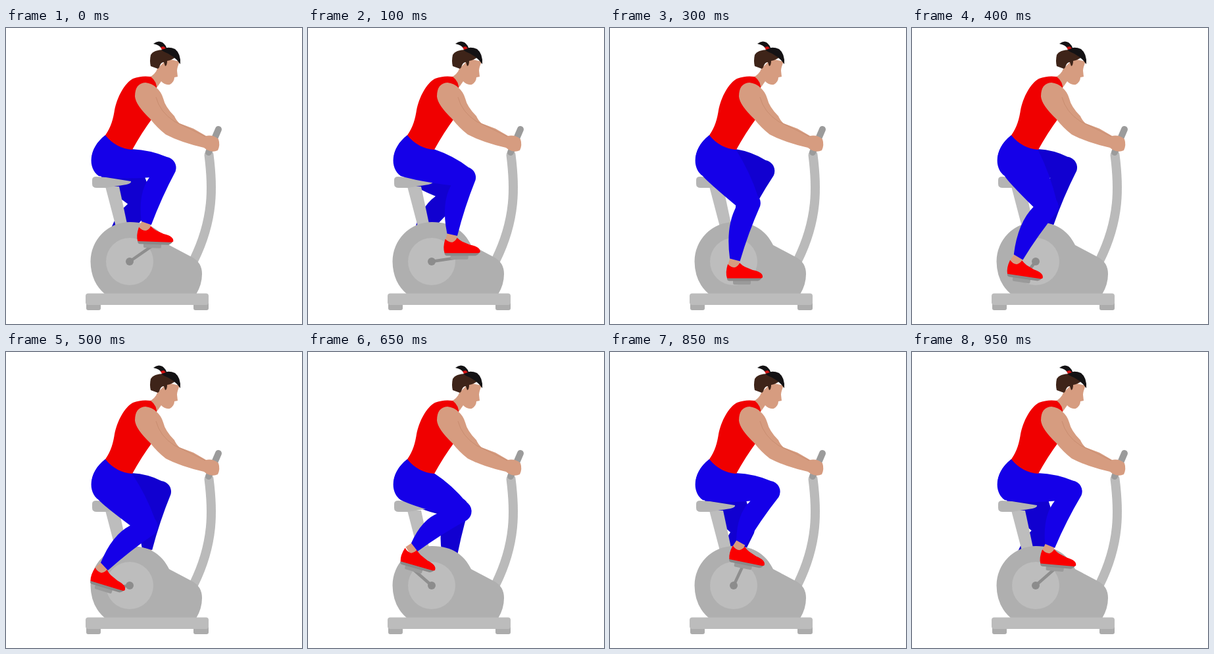
Animation, 450 px wide and 450 px high, one loop 1 s. Source, as an HTML page:

```html
<!DOCTYPE html>
<html lang="en">
<head>
<meta charset="utf-8">
<title>Exercise bike</title>
<style>
  html, body { margin: 0; width: 100%; height: 100%; overflow: hidden; background: #fff; }
  svg { display: block; width: 100vw; height: 100vh; }
</style>
</head>
<body>
<svg viewBox="0 0 450 450">
  <rect width="450" height="450" fill="#fff"/>

  <path id="farSkin" stroke="#d0967a" stroke-width="14"/>
  <path id="farLeg" fill="#1100d0"/>

  <!-- machine -->
  <path d="M151 241H172L185 302H167Z" fill="#bdbdbd"/>
  <path d="M131 231Q131 226 137 226L152 227L190 233Q191 236 183 238L152 243H138Q131 243 131 237Z" fill="#b4b4b4"/>
  <path d="M308.500 193C314.500 240 316.500 290 285.500 353" fill="none" stroke="#bababa" stroke-width="14" stroke-linecap="round"/>
  <path d="M308 189L323 154" stroke="#9b9b9b" stroke-width="10" stroke-linecap="round"/>
  <path d="M122 418H144V426Q144 429 141 429H125Q122 429 122 426ZM285 418H308V426Q308 429 305 429H288Q285 429 285 426Z" fill="#acacac"/>
  <path d="M188.500 295A60 60 0 0 0 128.500 355Q129 387 151 405H289Q298 390 298 374Q298 356 282 348L248 330C238 310 221 295 188.500 295Z" fill="#afafaf"/>
  <rect x="121" y="403.500" width="187" height="17.500" rx="4" fill="#bcbcbc"/>
  <circle cx="188" cy="355" r="36" fill="#bdbdbd"/>
  <path id="crank" stroke="#8e8e8e" stroke-width="4.500" stroke-linecap="round"/>
  <circle cx="188" cy="355" r="6" fill="#8c8c8c"/>

  <path id="nearSkin" stroke="#d69c80" stroke-width="15"/>
  <g id="foot">
    <path d="M0 23H27V28Q27 30 25 30H2Q0 30 0 28Z" fill="#9a9a9a"/>
    <path d="M-9 18H44Q44 22 38 24.500H-6Q-9 24 -9 21Z" fill="#8a8a8a"/>
    <path d="M-8 -1Q-3 4 3 4Q8 2 10 -3Q14 1 18 3L30 8Q46 11 45 19Q44 20.500 40 20.500H-9Q-12 12 -8 -1Z" fill="#fa0000"/>
  </g>
  <path id="nearLeg" fill="#1500e8"/>

  <!-- head and torso -->
  <path d="M230 62L238 54L246 47L264 51Q260 60 260 65L261 74L256 75Q256 82 249 86Q241 87 236 81L229 91L216 76Q227 71 230 62Z" fill="#d69c80"/>
  <path d="M241 33Q224 33 220 41Q218 50 220 58L231 62Q233 61 234 57Q236 52 240 52L242 58Q245 57 245 50Q252 49 258 44Z" fill="#3e2419"/>
  <path d="M236 33Q246 27 257 32Q266 39 265 55Q256 42 240 36ZM224 24Q231 18 238 22Q244 27 244 31L236 31Q234 26 224 24Z" fill="#141214"/>
  <path d="M235 29L240 28L243 31L237 33Z" fill="#d31212"/>
  <path d="M151 163C160 150 163 138 165 125C169 105 180 84 193 77Q206 72 220 74Q230 82 229 93L222 138Q207 158 192 185Q167 183 151 163Z" fill="#f00000"/>
  <path d="M196 104Q196 84 212 83Q222 84 229 91Q236 97 239 107Q242 120 256 134Q259 141 264 145L285 153L304 164Q315 162 323 169Q326 178 322 186Q314 190 305 185L301 182Q266 174 243 162Q230 152 219 138Q197 117 196 104Z" fill="#d69c80"/>
  <path d="M228 105Q234 128 256 142L285 156L303 165" fill="none" stroke="#c98d70" stroke-width="1"/>
</svg>
<script>
const LOOP = 1000, THIGH = 87, SHANK = 97;
const HUB = [188, 355], ORBIT = [41, 33], PEDAL = [13, 27];
const NEAR = { hip: [156, 200], rear: [141, 225] };
const FAR = { hip: [148, 203], rear: [145, 222] };
const FAR_DROP = [13, 19];

// time, crank phase, orbit scale, foot tilt
const KEYS = [
  [0, -40.8, 1.095, 2], [200, 31, 0.94, 0], [300, 73.2, 1.013, 0], [500, 170.2, 1, 17],
  [650, 227.4, 1.008, 16], [750, 261, 0.935, 16], [950, 312.6, 1.03, 5]
];

const $ = id => document.getElementById(id);
const rad = deg => deg * Math.PI / 180;
const add = (p, v, k = 1) => [p[0] + v[0] * k, p[1] + v[1] * k];
const sub = (p, q) => [p[0] - q[0], p[1] - q[1]];
const unit = v => { const n = Math.hypot(...v); return [v[0] / n, v[1] / n]; };
const normal = v => [v[1], -v[0]];
const pt = p => p[0].toFixed(2) + ' ' + p[1].toFixed(2);

function key(i) {
  const n = KEYS.length, turn = Math.floor(i / n);
  const [t, phase, scale, tilt] = KEYS[i - turn * n];
  return [t + turn * LOOP, phase + turn * 360, scale, tilt];
}

// Smooth periodic curve through the keys
function sample(time) {
  const t = time % LOOP;
  let i = KEYS.length - 1;
  while (KEYS[i][0] > t) i--;
  const [a, b, c, d] = [key(i - 1), key(i), key(i + 1), key(i + 2)];
  const h = c[0] - b[0], s = (t - b[0]) / h;
  const rate = (p, q, j) => (q[j] - p[j]) / (q[0] - p[0]);
  const slope = (p, q, r, j) => {
    const l = q[0] - p[0], m = r[0] - q[0];
    return (rate(p, q, j) * m + rate(q, r, j) * l) / (l + m);
  };
  return [1, 2, 3].map(j => {
    const m0 = slope(a, b, c, j) * h, m1 = slope(b, c, d, j) * h, rise = c[j] - b[j];
    return b[j] + s * (m0 + s * (3 * rise - 2 * m0 - m1 + s * (m0 + m1 - 2 * rise)));
  });
}

function pedalling(time) {
  const [phase, scale, tilt] = sample(time);
  const f = rad(phase), r = rad(tilt), c = Math.cos(r), s = Math.sin(r);
  const pedal = add(HUB, [ORBIT[0] * Math.cos(f), ORBIT[1] * Math.sin(f)], scale);
  const arm = [PEDAL[0] * c - PEDAL[1] * s, PEDAL[0] * s + PEDAL[1] * c];
  return { phase, pedal, tilt, ankle: sub(pedal, arm) };
}

// The far foot swings back less and stays lower on the rear of its orbit
function farAnkle(time) {
  const { phase, ankle } = pedalling(time);
  return add(ankle, FAR_DROP, ((1 - Math.cos(rad(phase - 35))) / 2) ** 2);
}

function kneeOf(hip, ankle) {
  const v = sub(ankle, hip), d = Math.hypot(...v), u = unit(v);
  const along = (THIGH ** 2 - SHANK ** 2 + d * d) / (2 * d);
  const out = Math.sqrt(Math.max(0, THIGH ** 2 - along ** 2));
  return add(add(hip, u, along), normal(u), out);
}

function drawLeg(name, side, foot) {
  const knee = kneeOf(side.hip, foot);
  const u = unit(sub(knee, side.hip)), n = normal(u);
  const v = unit(sub(foot, knee)), m = normal(v);
  const cuff = add(add(knee, v, 89), m, 0.8);

  // back of the knee lies on the bisector of thigh and shank
  const fold = unit(sub(v, u));
  const half = Math.acos(-(u[0] * v[0] + u[1] * v[1])) / 2;
  const back = add(knee, fold, 18 / Math.sin(half));

  const waist = [191, 184], top = add(knee, n, 16.5);
  const mid = add(add(waist, sub(top, waist), 0.55), n, 5);
  const front = add(knee, m, 16.5), toe = add(cuff, m, 8), heel = add(cuff, m, -8);
  const shin = add(add(front, sub(toe, front), 0.5), m, -3);
  const calf = add(add(back, sub(heel, back), 0.42), m, -13);
  const under = add(add(side.hip, n, -28), u, 20);

  $(name + 'Leg').setAttribute('d',
    `M151 163L${pt(waist)}Q${pt(mid)} ${pt(top)}` +
    `A16.5 16.5 0 0 1 ${pt(front)}Q${pt(shin)} ${pt(toe)}L${pt(heel)}` +
    `Q${pt(calf)} ${pt(back)}Q${pt(under)} ${pt(side.rear)}C124 213 125 183 151 163Z`);
  $(name + 'Skin').setAttribute('d', `M${pt(add(cuff, v, -3))}L${pt(add(foot, v, 3))}`);
}

function draw(time) {
  const near = pedalling(time);
  drawLeg('near', NEAR, near.ankle);
  drawLeg('far', FAR, farAnkle(time + LOOP / 2));
  $('crank').setAttribute('d', `M${pt(HUB)}L${pt(near.pedal)}`);
  $('foot').setAttribute('transform', `translate(${pt(near.ankle)}) rotate(${near.tilt.toFixed(2)})`);
}

const start = performance.now();
function tick() {
  const t = (performance.now() - start) % LOOP;
  draw(Math.floor(t / 50) * 50);
  requestAnimationFrame(tick);
}
tick();
</script>
</body>
</html>
```
